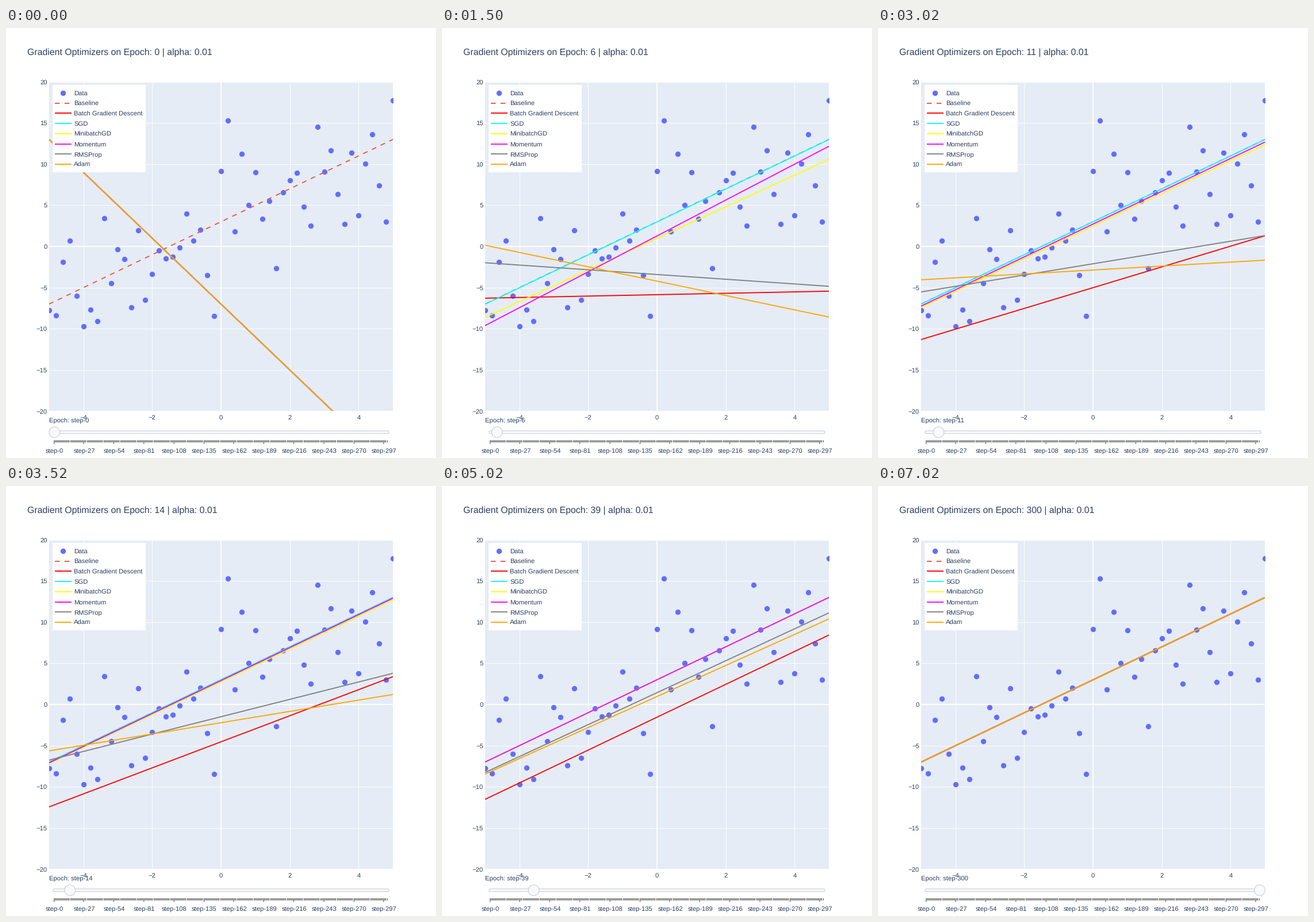
These frames come from a looping animation (748 by 748 pixels, 8020 ms). A matplotlib script:

```python
import numpy as np
import matplotlib.pyplot as plt
from matplotlib.animation import FuncAnimation
from matplotlib.collections import LineCollection
from matplotlib.patches import Circle, FancyBboxPatch, Rectangle

plt.rcParams.update({"font.family": "Liberation Sans", "text.hinting": "none"})

# The layout lives on an 800 unit square shown at 748 pixels.
SIZE, DPI = 748, 100
PT = SIZE / 800 * 72 / DPI
INK, PAPER, BORDER = "#2a3f5f", "#e5ecf6", "#bec8d9"
LEFT, RIGHT, TOP, BOTTOM = 80, 720, 100, 712.8

TICK = 20
DURATIONS = [250] * 6 + [520] + [250] * 20 + [1000]
STARTS = np.cumsum([0] + DURATIONS[:-1])
EPOCHS = [*range(12), 12, 14, 16, 18, 22, 27, 32, 39,
          49, 61, 77, 96, 126, 167, 223, 300]

SAMPLES = [
    -7.76, -8.37, -1.92, 0.70, -6.00, -9.68, -7.71, -9.10, 3.42, -4.49,
    -0.35, -1.55, -7.42, 1.96, -6.47, -3.37, -0.51, -1.50, -1.29, -0.14,
    3.98, 0.70, 2.03, -3.51, -8.46, 9.11, 15.29, 1.78, 11.23, 5.03,
    8.99, 3.32, 5.52, -2.68, 6.59, 8.01, 8.92, 4.83, 2.52, 14.49,
    9.08, 11.63, 6.35, 2.69, 11.38, 3.74, 10.07, 13.63, 7.37, 3.00, 17.76]

SLOPE, BIAS = 2, 3            # the line every optimizer converges to
SLOPE_GAP, BIAS_GAP = -6, -10  # distance from it at the start
BIAS_RATE, SLOPE_RATE = 0.98, 0.8267


def px(x):
    return LEFT + (np.asarray(x) + 5) * (RIGHT - LEFT) / 10


def py(y):
    return TOP + (20 - np.asarray(y)) * (BOTTOM - TOP) / 40


# Each optimizer returns its remaining (slope, bias) error after an epoch.
def plain(steps):
    def error(epoch):
        n = steps * epoch
        return SLOPE_GAP * SLOPE_RATE ** n, BIAS_GAP * BIAS_RATE ** n
    return error


def minibatch(epoch):
    slope, bias = plain(13.2)(epoch)
    return slope + 0.04 * bias * (epoch > 0), bias


def momentum(epoch):
    n = 13.4 * epoch
    swing = np.cos(0.1247 * n) + 0.35 * np.sin(0.1247 * n)
    bias = 1.5 * 0.9735 ** n - 0.5 * 0.9245 ** n
    return SLOPE_GAP * 0.957 ** n * swing, BIAS_GAP * bias


def adaptive(slope_fit, bias_fit):
    def remaining(epoch, share, slow, fast):
        late = 0.0125 * max(0, epoch - 39)
        return (share * np.exp(-slow * epoch - late)
                + (1 - share) * np.exp(-fast * epoch))

    def error(epoch):
        return (SLOPE_GAP * remaining(epoch, *slope_fit),
                BIAS_GAP * remaining(epoch, *bias_fit))
    return error


OPTIMIZERS = [
    ("Batch Gradient Descent", "red", plain(1)),
    ("SGD", "cyan", plain(51)),
    ("MinibatchGD", "yellow", minibatch),
    ("Momentum", "magenta", momentum),
    ("RMSProp", "gray", adaptive((0.735, 0.11, 0.9), (0.808, 0.042, 0.45))),
    ("Adam", "orange", adaptive((0.858, 0.0975, 0.9), (0.879, 0.0375, 0.304))),
]

fig = plt.figure(figsize=(SIZE / DPI, SIZE / DPI), dpi=DPI, facecolor="white")
ax = fig.add_axes([0, 0, 1, 1])
ax.set(xlim=(0, 800), ylim=(800, 0))
ax.axis("off")


def text(x, y, label, size=12, ha="left"):
    return ax.text(x, y, label, fontsize=size * PT, color=INK, ha=ha,
                   va="baseline", zorder=8)


def line(x, y, color, z, width=2, **style):
    style.setdefault("solid_capstyle", "butt")
    return ax.plot(x, y, color=color, lw=width * PT, zorder=z, **style)[0]


def dots(x, y, z):
    return ax.plot(x, y, "o", color="#636efa", ms=10 * PT, mew=0, zorder=z,
                   snap=False)[0]


DASHED = dict(linestyle=(0, (4.5, 4.5)), dash_capstyle="butt")

# Plot area
panel = ax.add_patch(Rectangle((LEFT, TOP), RIGHT - LEFT, BOTTOM - TOP,
                               fc=PAPER, lw=0, zorder=0))
for v in range(-4, 5, 2):
    line([px(v)] * 2, [TOP, BOTTOM], "white", 1, 1 if v else 2)
    text(px(v), 728, str(v).replace("-", "\u2212"), ha="center")
for v in range(-20, 21, 5):
    line([LEFT, RIGHT], [py(v)] * 2, "white", 1, 1 if v else 2)
    text(77, py(v) + 4.2, str(v).replace("-", "\u2212"), ha="right")

ends = np.array([-5, 5])
dots(px(np.linspace(-5, 5, 51)), py(SAMPLES), 2).set_clip_path(panel)
line(px(ends), py(SLOPE * ends + BIAS), "#ef553b", 3,
     **DASHED).set_clip_path(panel)
fits = [line(px(ends), py(ends), color, 4) for _, color, _ in OPTIMIZERS]
for fit in fits:
    fit.set_clip_path(panel)

# Legend
LX, LY = 86.4, 106.1
ax.add_patch(Rectangle((LX, LY), 173.6, 162, fc="white", lw=0, zorder=5))
entries = [("Data", None), ("Baseline", "#ef553b")]
entries += [(name, color) for name, color, _ in OPTIMIZERS]
for row, (name, color) in enumerate(entries):
    y = LY + 14.5 + 19 * row
    text(LX + 40, y + 4.4, name)
    if color is None:
        dots([LX + 20], [y], 6)
    else:
        line([LX + 5, LX + 35], [y, y], color, 6,
             **(DASHED if name == "Baseline" else {}))

# Slider
def slider_x(step):
    return 90 + 620 * step / 300


ax.add_patch(FancyBboxPatch((90, 752), 620, 0,
                            boxstyle="round,pad=2.5,rounding_size=2.5",
                            fc="#f8fafc", ec=BORDER, lw=PT, zorder=5))
grip = ax.add_patch(Circle((90, 752), 10, fc="#f8fafc", ec=BORDER, lw=PT,
                           zorder=6))
marks = []
for step in range(301):
    x = np.floor(slider_x(step)) - 0.5
    marks.append([(x, 767), (x, 771 if step % 27 else 774)])
    if step % 27 == 0:
        text(slider_x(step), 790, f"step-{step}", ha="center")
ax.add_collection(LineCollection(marks, colors="#333333", linewidths=PT,
                                 antialiaseds=True, snap=False, zorder=5),
                  autolim=False)

title = text(40, 50, "", 17)
counter = text(80, 734, "")


def update(frame):
    moment = frame * TICK + TICK / 2
    epoch = EPOCHS[np.searchsorted(STARTS, moment, side="right") - 1]
    for fit, (_, _, error) in zip(fits, OPTIMIZERS):
        slope, bias = error(epoch)
        fit.set_ydata(py((SLOPE + slope) * ends + BIAS + bias))
    title.set_text(f"Gradient Optimizers on Epoch: {epoch} | alpha: 0.01")
    counter.set_text(f"Epoch: step-{epoch}")
    grip.center = slider_x(epoch), 752
    return [*fits, title, counter, grip]


animation = FuncAnimation(fig, update, frames=sum(DURATIONS) // TICK,
                          interval=TICK, repeat=True, repeat_delay=0)
plt.show()
```
